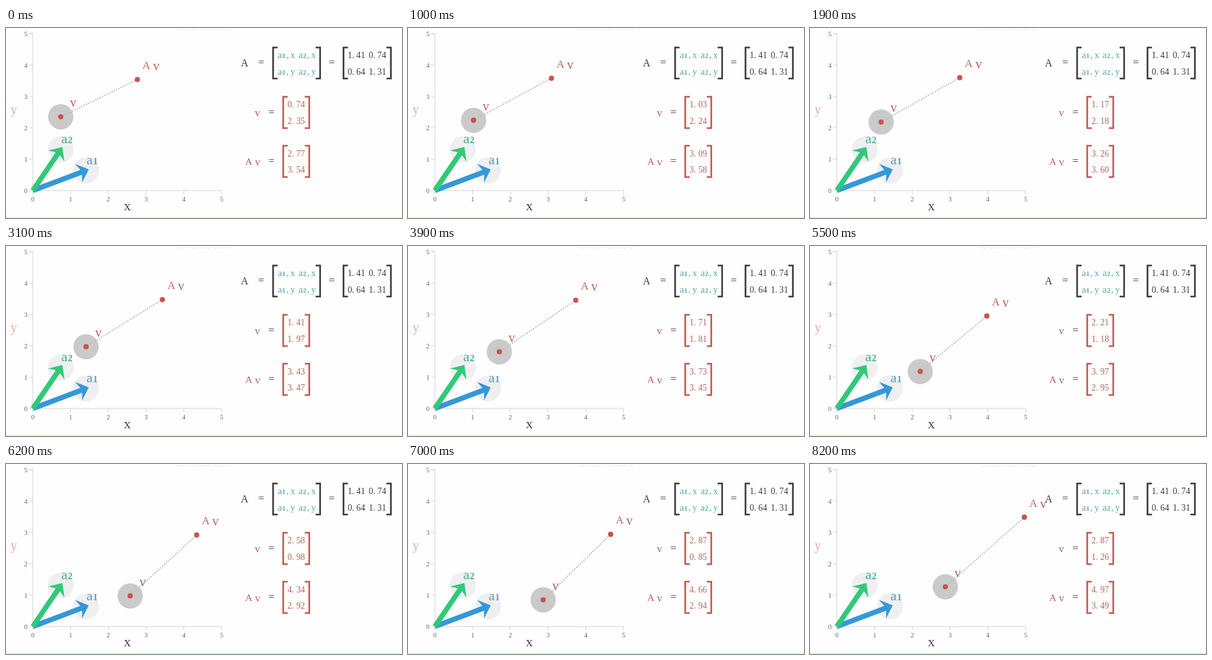
An HTML page that plays this animation: 620x297 px, repeating every 8.3 s.

```html
<!DOCTYPE html>
<html lang="en">
<head>
<meta charset="utf-8">
<title>Matrix times vector</title>
<style>
  html, body { margin: 0; width: 100%; height: 100%; overflow: hidden; background: #fefefe; }
  svg { display: block; width: 620px; height: 297px; font-family: "Liberation Serif", "Noto Serif", serif; }
  .axis { fill: none; stroke: #d2d2d2; }
  .tick { font-size: 10.5px; fill: #666; }
  .halo { fill: #efeef1; }
  .bracket { fill: none; stroke-width: 2.6; }
  .num { font-size: 13.6px; }
</style>
</head>
<body>
<svg id="stage" viewBox="0 0 620 297"></svg>
<script>
const LOOP = 8300, STEP = 100;
const RED = '#c8544c', ROSE = '#b5665f', DARK = '#3c3a3c';
const BLUE = '#3498d8', GREEN = '#31c978';
const BLUE_TEXT = '#629eb4', GREEN_TEXT = '#4fae92';
const stage = document.getElementById('stage');

const px = x => 42 + 59.1 * x;
const py = y => 254 - 49 * y;

function add(tag, attrs, parent = stage) {
  const el = document.createElementNS('http://www.w3.org/2000/svg', tag);
  for (const k in attrs) el.setAttribute(k, attrs[k]);
  parent.appendChild(el);
  return el;
}

function text(str, x, y, size, fill, anchor = 'start', parent = stage) {
  const el = add('text', { x, y, fill, 'font-size': size, 'text-anchor': anchor }, parent);
  el.textContent = str;
  return el;
}

function bracket(left, right, top, bottom, stroke) {
  add('path', {
    class: 'bracket', stroke,
    d: `M${left + 7} ${top}H${left}V${bottom}h7M${right - 7} ${top}H${right}V${bottom}h-7`
  });
}

// The point is given its own half-em cell, like every digit
const spaced = n => n.toFixed(2).replace('.', '. ');

function number(n, x, y, fill) {
  const el = text(spaced(n), x, y, 13.6, fill);
  el.setAttribute('class', 'num');
  return el;
}

function arrow(x, y, fill) {
  const dx = px(x) - 42, dy = py(y) - 254;
  const len = Math.hypot(dx, dy), angle = Math.atan2(dy, dx) * 180 / Math.PI;
  add('path', {
    fill, transform: `translate(42 254) rotate(${angle})`,
    d: `M0-4H${len - 8}L${len - 12.5}-15.5L${len + 4.5} 0L${len - 12.5} 15.5L${len - 8} 4H0Z`
  });
}

function subscripted(digit, x, y, size, fill) {
  text('a', x, y, size, fill);
  text(digit, x + size * 0.47, y, size * 0.68, fill).setAttribute('font-weight', 'bold');
}

// Backdrop
add('path', { d: 'M268 3H356', stroke: '#efefef', 'stroke-width': 1.5, 'stroke-dasharray': '9 4 6 3' });
add('path', { d: 'M0 296.5H620', stroke: '#d3f9c4', 'stroke-width': 1.5 });

// Axes
add('path', { class: 'axis', d: 'M36 8.5H42V254H337.5V260' });
for (let k = 0; k <= 5; k++) {
  add('path', { class: 'axis', d: `M36 ${py(k)}H42M${px(k)} 254V260` });
  text(k, px(k), 271, 10.5, '#666', 'middle');
  text(k, 31, py(k) + 3.7, 10.5, '#666', 'middle');
}
text('x', 190, 285, 22, '#4a4648', 'middle');
text('y', 12.3, 133.5, 20, '#e2ada2', 'middle');

// Column vectors
for (const [x, y] of [[1.41, 0.64], [0.74, 1.31]])
  add('circle', { class: 'halo', cx: px(x), cy: py(y), r: 20.3 });
const halo = add('circle', { r: 19.8, fill: '#cacaca' });
arrow(1.41, 0.64, BLUE);
arrow(0.74, 1.31, GREEN);
subscripted('1', 126, 212.5, 22, BLUE_TEXT);
subscripted('2', 86.5, 180, 22, GREEN_TEXT);

// Moving points
const link = add('line', { stroke: '#bcbcbc', 'stroke-width': 2, 'stroke-dasharray': '2 2' });
const vMark = add('g', {}), avMark = add('g', {});
for (const g of [vMark, avMark]) add('circle', { r: 4.1, fill: RED }, g);
text('v', 19.5, -15.5, 20, ROSE, 'middle', vMark);
text('A', 14, -16.5, 17, ROSE, 'middle', avMark);
text('v', 29.5, -14.5, 20, ROSE, 'middle', avMark);

// Equations
const equals = (x, y) => text('=', x, y + 4.8, 17, DARK, 'middle');
text('A', 373.5, 60, 16, DARK, 'middle');
equals(399.5, 54);
bracket(418.2, 491.8, 30.5, 79, DARK);
[['x', 47], ['y', 72.5]].forEach(([axis, y]) => {
  [['1', 425.5, BLUE_TEXT], ['2', 458, GREEN_TEXT]].forEach(([digit, x, fill]) => {
    subscripted(digit, x, y, 15, fill);
    text(',', x + 13.5, y, 14, fill);
    text(axis, x + 20, y, 14, fill);
  });
});
equals(510, 54);
bracket(528.4, 602.6, 30.5, 79, DARK);
number(1.41, 535, 47, DARK);
number(0.74, 568, 47, DARK);
number(0.64, 535, 73, DARK);
number(1.31, 568, 73, DARK);

text('v', 393.8, 138, 17, ROSE, 'middle');
equals(415.5, 132);
bracket(434, 474.8, 107.5, 156.5, RED);
text('A', 380, 214, 15.5, ROSE, 'middle');
text('v', 394, 214.5, 17, ROSE, 'middle');
equals(415.5, 208);
bracket(434, 474.8, 184, 233, RED);
const readouts = [124, 149.5, 200.5, 226].map(y => number(0, 440.8, y, ROSE));

// Dragged path of v: [time, x, y]
const path = [
  [0, 0.74, 2.35], [1900, 1.174, 2.184], [2000, 1.174, 2.184], [3100, 1.41, 1.97],
  [3900, 1.709, 1.809], [5500, 2.21, 1.18], [7000, 2.87, 0.85], [8200, 2.874, 1.2649]
];

function slope(i, c) {
  const rise = j => (path[j + 1][c] - path[j][c]) / (path[j + 1][0] - path[j][0]);
  if (i === 0) return rise(0);
  if (i === path.length - 1) return rise(i - 1);
  const a = rise(i - 1), b = rise(i);
  return a * b > 0 ? 2 * a * b / (a + b) : 0;
}

// Monotone cubic through the path points
function at(t, c) {
  let i = 0;
  while (i < path.length - 2 && t >= path[i + 1][0]) i++;
  const p = path[i], q = path[i + 1], h = q[0] - p[0];
  const u = Math.min(1, (t - p[0]) / h), w = 1 - u;
  return p[c] * w * w * (1 + 2 * u) + q[c] * u * u * (3 - 2 * u)
    + h * u * w * (slope(i, c) * w - slope(i + 1, c) * u);
}

function draw(t) {
  const x = at(t, 1), y = at(t, 2);
  const ax = 1.405 * x + 0.736 * y, ay = 0.638 * x + 1.306 * y;
  const [x1, y1, x2, y2] = [px(x), py(y), px(ax), py(ay)];
  halo.setAttribute('cx', x1);
  halo.setAttribute('cy', y1);
  Object.entries({ x1, y1, x2, y2 }).forEach(([k, n]) => link.setAttribute(k, n));
  vMark.setAttribute('transform', `translate(${x1} ${y1})`);
  avMark.setAttribute('transform', `translate(${x2} ${y2})`);
  [x, y, ax, ay].forEach((n, i) => { readouts[i].textContent = spaced(n); });
}

const start = performance.now();
function tick() {
  const t = (performance.now() - start) % LOOP;
  draw(Math.floor(t / STEP) * STEP);
  requestAnimationFrame(tick);
}
tick();
</script>
</body>
</html>
```
